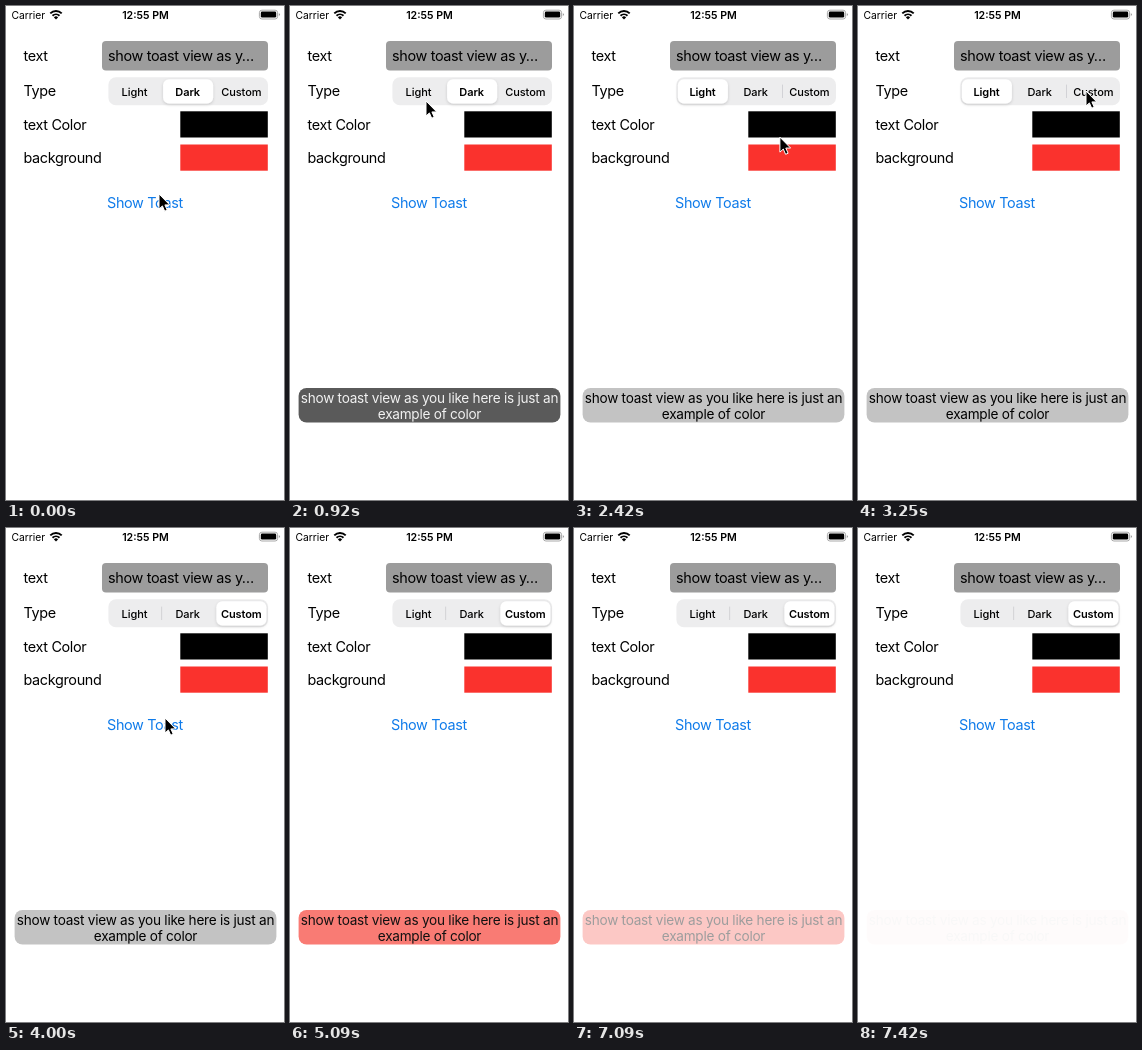
An HTML page that plays this animation: 278x494 px, repeating every 7580 ms.

```html
<!DOCTYPE html>
<html lang="en">
<head>
<meta charset="utf-8">
<title>Toast demo</title>
<style>
  html, body { margin: 0; width: 100%; height: 100%; overflow: hidden; background: #fff; }
  svg { display: block; width: 100%; height: 100%; }
  text { font-family: Inter, "Liberation Sans", sans-serif; }
  .body { font-size: 14.4px; letter-spacing: -.33px; }
  .seg { font-size: 11px; letter-spacing: -.08px; font-weight: 500; text-anchor: middle; }
  .toast text { font-size: 13.6px; letter-spacing: -.25px; text-anchor: middle; }
</style>
</head>
<body>
<svg id="stage" viewBox="0 0 278 494" preserveAspectRatio="none">
  <defs>
    <filter id="lift" x="-20%" y="-20%" width="140%" height="150%">
      <feDropShadow dx="0" dy="1.2" stdDeviation="1.5" flood-color="#000" flood-opacity=".16"/>
    </filter>
  </defs>
  <rect width="278" height="494" fill="#fff"/>

  <!-- status bar -->
  <text x="5.5" y="12.7" font-size="10.3">Carrier</text>
  <g fill="none" stroke="#000" stroke-width="1.9">
    <path d="M44.3 7.4a8 8 0 0 1 11.4 0"/>
    <path d="M46.5 9.8a5 5 0 0 1 7 0"/>
  </g>
  <path d="M50 13.6l-2.1-2.2a3 3 0 0 1 4.2 0z"/>
  <text x="139.5" y="12.8" font-size="10.6" font-weight="600" text-anchor="middle">12:55 PM</text>
  <rect x="253.4" y="4.2" width="18.2" height="8.8" rx="2.5" fill="none" stroke="#a0a0a0" stroke-width=".9"/>
  <rect x="254.8" y="5.6" width="15.4" height="6" rx="1.4"/>
  <path d="M272.8 7.2q1.3 .4 1.3 1.4t-1.3 1.4z" fill="#a0a0a0"/>

  <!-- form -->
  <g class="body">
    <text x="17.5" y="55">text</text>
    <text x="17.5" y="90.3">Type</text>
    <text x="17.5" y="124">text Color</text>
    <text x="17.5" y="157">background</text>
    <rect x="96" y="35" width="166" height="29.6" rx="4" fill="#9c9c9c"/>
    <text x="102" y="55">show toast view as y…</text>
    <text x="101" y="202" fill="#0f7bea">Show Toast</text>
  </g>
  <rect x="102.4" y="71.3" width="159.6" height="28" rx="7.6" fill="#ededee"/>
  <rect id="leftLine" x="155.2" y="78.6" width=".9" height="13.4" fill="#d0d0d3"/>
  <rect id="rightLine" x="208" y="78.6" width=".9" height="13.4" fill="#d0d0d3"/>
  <rect id="pill" y="73.2" width="50" height="24.2" rx="6" fill="#fff" filter="url(#lift)"/>
  <g id="tabs"></g>
  <rect x="174.3" y="105.3" width="87.5" height="26.2"/>
  <rect x="174.3" y="138.5" width="87.5" height="26.2" fill="#fa322d"/>

  <g id="toasts"></g>
  <path id="cursor" d="M0 0V15L3.4 11.9L5.7 17.2L8.2 16.1L5.9 10.9H10.7Z" stroke="#fff" stroke-width="1" stroke-linejoin="round"/>
</svg>
<script>
const LOOP = 7580, TICK = 1000 / 12;
const $ = id => document.getElementById(id);

function add(parent, name, attrs, content = '') {
  const el = document.createElementNS('http://www.w3.org/2000/svg', name);
  for (const key in attrs) el.setAttribute(key, attrs[key]);
  el.textContent = content;
  parent.append(el);
  return el;
}

const tabs = ['Light', 'Dark', 'Custom'].map((label, i) =>
  add($('tabs'), 'text', { class: 'seg', x: [128.5, 181.7, 235.3][i], y: 89.5 }, label));

const toasts = [['#5a5a5a', '#f2f2f2'], ['#c3c3c3', '#000'], ['#f97b74', '#111']].map(([back, ink]) => {
  const g = add($('toasts'), 'g', { class: 'toast', fill: ink });
  add(g, 'rect', { x: 8.6, y: 382, width: 261.8, height: 34.6, rx: 8, fill: back });
  add(g, 'text', { x: 139.5, y: 397 }, 'show toast view as you like here is just an');
  add(g, 'text', { x: 139.5, y: 413.4 }, 'example of color');
  return g;
});

const ease = {
  line: u => u,
  in: u => u * u,
  out: u => 1 - (1 - u) ** 2,
  both: u => u * u * (3 - 2 * u)
};
const mix = (a, b, u) => a + (b - a) * u;
const part = (t, start, length) => Math.min(1, Math.max(0, (t - start) / length));

// time, x, y, easing towards this point
const path = [
  [0, 153, 188], [160, 153, 188, 'line'], [840, 137, 98, 'both'],
  [917, 136, 95, 'line'], [1084, 131, 86, 'out'], [1330, 131, 86, 'line'],
  [1960, 154, 203, 'both'], [2060, 154, 203, 'line'],
  [2417, 206, 131, 'in'], [2750, 223, 93, 'out'],
  [2900, 223, 93, 'line'], [3000, 224, 92, 'line'],
  [3160, 224, 92, 'line'], [3250, 228, 85, 'out'], [3500, 228, 85, 'line'],
  [4000, 159, 190, 'both'], [4420, 159, 190, 'line'], [5080, 281, 108, 'both']
];

function cursorAt(t) {
  const i = path.findIndex(p => p[0] > t);
  if (i < 0) return [300, 108];
  const [a, b] = [path[i - 1], path[i]];
  const u = ease[b[3]]((t - a[0]) / (b[0] - a[0]));
  return [mix(a[1], b[1], u), mix(a[2], b[2], u)];
}

function draw(time) {
  const t = Math.floor(time % LOOP / TICK) * TICK;

  const toLight = ease.both(part(t, 1200, 350));
  const toCustom = ease.both(part(t, 3450, 400));
  $('pill').setAttribute('x', mix(mix(157.1, 103.9, toLight), 210.4, toCustom));
  $('leftLine').setAttribute('opacity', toCustom);
  $('rightLine').setAttribute('opacity', toLight * (1 - toCustom));
  const chosen = t < 1200 ? 1 : t < 3450 ? 0 : 2;
  tabs.forEach((tab, i) => tab.style.fontWeight = i === chosen ? 600 : 500);

  const shown = [30, 2030, 4290].map(start => ease.both(part(t, start, 330)));
  const leave = 1 - ease.both(part(t, 6550, 950));
  toasts.forEach((toast, i) => {
    const covered = shown[i + 1] === 1;
    toast.setAttribute('opacity', covered ? 0 : shown[i] * (i === 2 ? leave : 1));
  });

  $('cursor').setAttribute('transform', `translate(${cursorAt(t)})`);
}

const begin = performance.now();
function loop() {
  draw(performance.now() - begin);
  requestAnimationFrame(loop);
}
loop();
</script>
</body>
</html>
```
